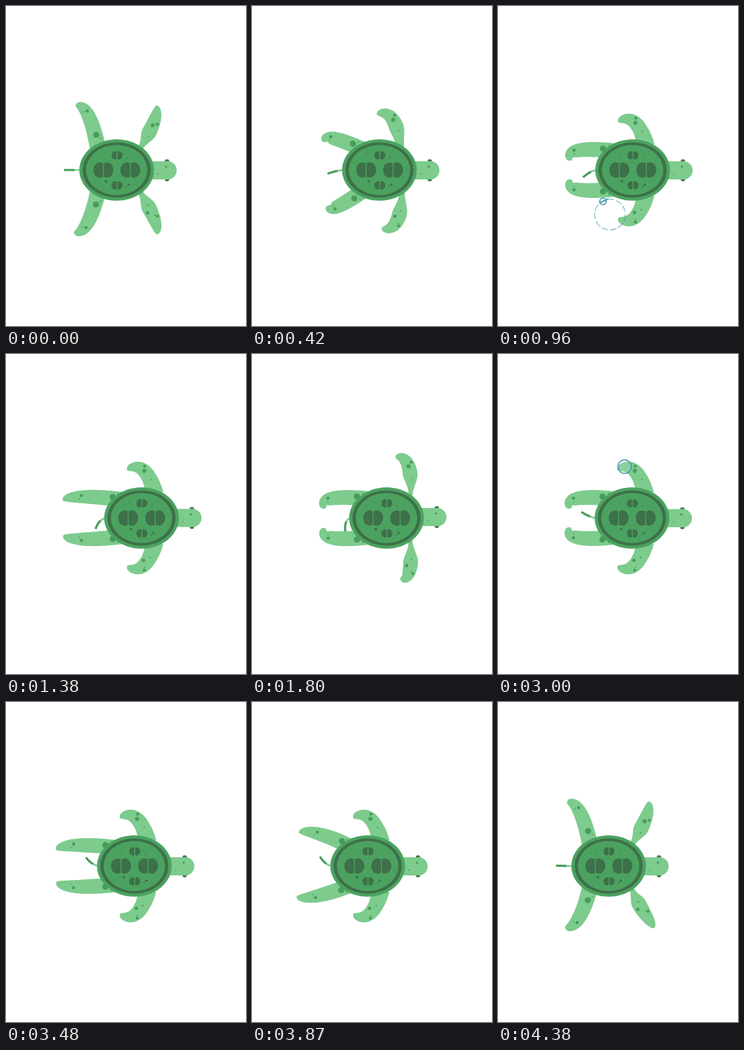
These frames come from a looping animation (360 px wide and 480 px high, 4410 ms). An HTML page with a canvas:

```html
<!DOCTYPE html>
<html lang="en">
<head>
<meta charset="utf-8">
<title>Swimming turtle</title>
<style>
html, body { margin: 0; width: 100%; height: 100%; overflow: hidden; background: #fff; }
canvas { display: block; width: 360px; height: 480px; }
</style>
</head>
<body>
<canvas id="stage" width="360" height="480"></canvas>
<script>
const LOOP = 4410, TAU = 2 * Math.PI;
const LIGHT = '#7dcb8d', SHELL = '#4ba260', DARK = '#3e7049', SPOT = '#479c5a';
const ctx = document.getElementById('stage').getContext('2d');

// Poses: base, bend and tip of the centre line (x, y each), then half-width at the base.
const rearPoses = {
  spread: [-28, -31, -39, -98, -60, -98, 12],
  fan: [-28, -26, -68, -48, -92, -69, 12],
  tuck: [-16, -28, -104, -37, -92, -14, 11],
  straight: [-20, -27, -88, -35, -119, -27, 11]
};
const frontPoses = {
  reach: [36, -34, 58, -69, 60, -97, 4],
  hook: [36, -34, 40, -92, 13, -91, 3],
  tuck: [20, -36, 8, -86, -22, -72, 13],
  stretch: [33, -36, 38, -75, 80, -88, 3]
};
const timeline = (poses, steps) => steps.map(([t, name]) => [t, ...poses[name]]);
const rear = timeline(rearPoses, [
  [100, 'spread'], [620, 'tuck'], [960, 'tuck'], [1350, 'straight'], [1800, 'tuck'],
  [2280, 'fan'], [2480, 'spread'], [2740, 'tuck'], [3000, 'tuck'], [3550, 'straight']
]);
const front = timeline(frontPoses, [
  [0, 'reach'], [300, 'hook'], [620, 'tuck'], [1580, 'tuck'], [1800, 'hook'],
  [2350, 'stretch'], [2460, 'reach'], [2580, 'hook'], [2760, 'tuck'], [3870, 'tuck'],
  [4110, 'hook'], [4270, 'stretch'], [4360, 'reach']
]);
const drift = [
  [0, 0], [620, 34], [1620, 37.5], [1850, 35], [2350, 24],
  [2700, 35.5], [3240, 34], [3870, 7.5], [4200, 0]
];
const wag = [[0, 0], [960, 11], [2280, 24], [3000, -9], [3870, -14]];

// Spots: position along the flipper, sideways offset, radius.
const rearSpots = [[.18, 2, 4.6], [.12, 7, 1.1], [.62, 3, 2.4], [.66, -2, .9]];
const frontSpots = [[.5, 1, 3], [.56, 7, 2.2], [.25, 2, 1.1]];
const lowSpots = [[.42, -5, 2.5], [.57, 7, 2.2], [.53, 4, 1.1], [.28, 1, 1.2]];
const bubbles = [
  { start: 615, x: 168, y: 313, size: 35, life: 525 },
  { start: 880, x: 157.5, y: 293, size: 24, life: 400, glint: true },
  { start: 2850, x: 190, y: 169, size: 33, life: 495 }
];

const wrap = t => (t % LOOP + LOOP) % LOOP;

// Smooth periodic interpolation without overshoot.
function sample(rows, time) {
  const t = wrap(time), n = rows.length;
  const row = i => rows[(i + n) % n];
  const at = i => row(i)[0] + Math.floor(i / n) * LOOP;
  let i = n - 1;
  while (i >= 0 && at(i) > t) i--;
  const span = at(i + 1) - at(i), u = (t - at(i)) / span;
  return row(i).slice(1).map((a, k) => {
    const slope = j => (row(j + 1)[k + 1] - row(j)[k + 1]) / (at(j + 1) - at(j));
    const tangent = j => {
      const p = slope(j - 1), q = slope(j);
      return p * q > 0 ? 2 * p * q / (p + q) : 0;
    };
    const b = row(i + 1)[k + 1];
    return a + (b - a) * smooth(u)
      + span * u * (1 - u) * (tangent(i) * (1 - u) - tangent(i + 1) * u);
  });
}

function smooth(u) {
  return u * u * (3 - 2 * u);
}

// Point on a quadratic curve, moved sideways.
function bend([x0, y0, x1, y1, x2, y2], u, side = 0) {
  const v = 1 - u;
  const dx = v * (x1 - x0) + u * (x2 - x1), dy = v * (y1 - y0) + u * (y2 - y1);
  const len = Math.hypot(dx, dy) || 1;
  return [
    v * v * x0 + 2 * u * v * x1 + u * u * x2 - dy / len * side,
    v * v * y0 + 2 * u * v * y1 + u * u * y2 + dx / len * side
  ];
}

function ellipse(x, y, rx, ry, color, from = 0, to = TAU) {
  ctx.beginPath();
  ctx.ellipse(x, y, rx, ry, 0, from, to);
  ctx.fillStyle = color;
  ctx.fill();
}

function flipper(pose, spots) {
  const root = pose[6], mid = 11.5, steps = 32;
  const half = u =>
    (root + (mid - root) * smooth(Math.min(1, u / .34))) * Math.sqrt(1 - u ** 4);
  ctx.beginPath();
  for (let i = 0; i <= steps; i++) ctx.lineTo(...bend(pose, i / steps, half(i / steps)));
  for (let i = steps; i >= 0; i--) {
    const u = i / steps;
    ctx.lineTo(...bend(pose, u, -half(u) * (1 - .5 * u * u)));
  }
  ctx.fillStyle = LIGHT;
  ctx.fill();
  for (const [u, side, r] of spots) ellipse(...bend(pose, u, side), r, r, SPOT);
}

function drawTail(t) {
  const [y] = sample(wag, t);
  const path = [-54, 0, -64, y * .15, -79 + y * y / 26, y];
  const line = (from, color, width) => {
    ctx.beginPath();
    for (let i = 0; i <= 12; i++) ctx.lineTo(...bend(path, from + (1 - from) * i / 12));
    ctx.strokeStyle = color;
    ctx.lineWidth = width;
    ctx.stroke();
  };
  line(0, LIGHT, 2.6);
  line(.42, SPOT, 3.2);
}

function drawHead(t) {
  const nod = -2.3 * Math.max(0, Math.cos(TAU * (t - 2100) / LOOP)) ** 2;
  ctx.save();
  ctx.translate(0, nod);
  for (const y of [-13.5, 14.5]) ellipse(75.5, y, 3.2, 2.4, DARK);
  ctx.beginPath();
  ctx.moveTo(48, -13);
  ctx.arc(76.3, .5, 13.7, -Math.PI / 2, Math.PI / 2);
  ctx.lineTo(48, 14);
  ctx.fillStyle = LIGHT;
  ctx.fill();
  ellipse(74, -5, 1.7, 1.7, SPOT);
  ellipse(62, 6, .9, .9, SPOT);
  ctx.restore();
}

// Two rounded halves with a narrow gap.
function scute(x, y, w, h) {
  const rx = w * .64, cut = Math.acos((w - rx - .7) / rx);
  ellipse(x - w + rx, y, rx, h, DARK, cut, TAU - cut);
  ellipse(x + w - rx, y, rx, h, DARK, Math.PI + cut, 3 * Math.PI - cut);
}

function drawShell() {
  ellipse(0, 0, 56, 46, SHELL);
  ellipse(0, 0, 51, 41.5, DARK);
  ellipse(0, 0, 46, 37.5, SHELL);
  for (const x of [-20, 20.5]) scute(x, 0, 15, 11.5);
  for (const y of [-22, 23]) scute(.5, y, 8.3, 6.2);
  for (const [x, y, r] of [[-19, -24, 1], [16, -18, 1], [-16, 17, 2], [18, 22, 1.8], [15, 25, 1]]) {
    ellipse(x, y, r, r, DARK);
  }
}

function drawBubble(t, { start, x, y, size, life, glint }) {
  const p = (t - start) / life;
  if (p <= 0 || p >= 1) return;
  const r = size * p, late = p > .5;
  ctx.save();
  ctx.globalAlpha = Math.max(0, .5 - p);
  ellipse(x, y, r, r, '#c4e5f2');
  ctx.globalAlpha = 1 - p * .5;
  ctx.strokeStyle = '#3f8fae';
  ctx.lineWidth = 2 - 1.2 * p;
  if (late) ctx.setLineDash([10, 3]);
  ctx.beginPath();
  ctx.arc(x, y, r, 0, TAU);
  if (glint && !late) {
    ctx.moveTo(x - 6, y + 3);
    ctx.lineTo(x + 8, y - 4);
  }
  ctx.stroke();
  ctx.restore();
}

function draw(t) {
  ctx.fillStyle = '#fff';
  ctx.fillRect(0, 0, 360, 480);
  ctx.save();
  ctx.translate(166 + sample(drift, t)[0], 246);
  drawTail(t);
  // The lower pair runs slightly out of step with the upper one.
  const lead = -60 * Math.cos(TAU * t / LOOP);
  for (const low of [false, true]) {
    const time = low ? t + lead : t;
    ctx.save();
    if (low) ctx.scale(1, -1);
    flipper(sample(rear, time), rearSpots);
    flipper(sample(front, time), low ? lowSpots : frontSpots);
    ctx.restore();
  }
  drawHead(t);
  drawShell();
  ctx.restore();
  for (const bubble of bubbles) drawBubble(t, bubble);
}

const began = performance.now();
function tick() {
  draw(wrap(performance.now() - began));
  requestAnimationFrame(tick);
}
tick();
</script>
</body>
</html>
```
